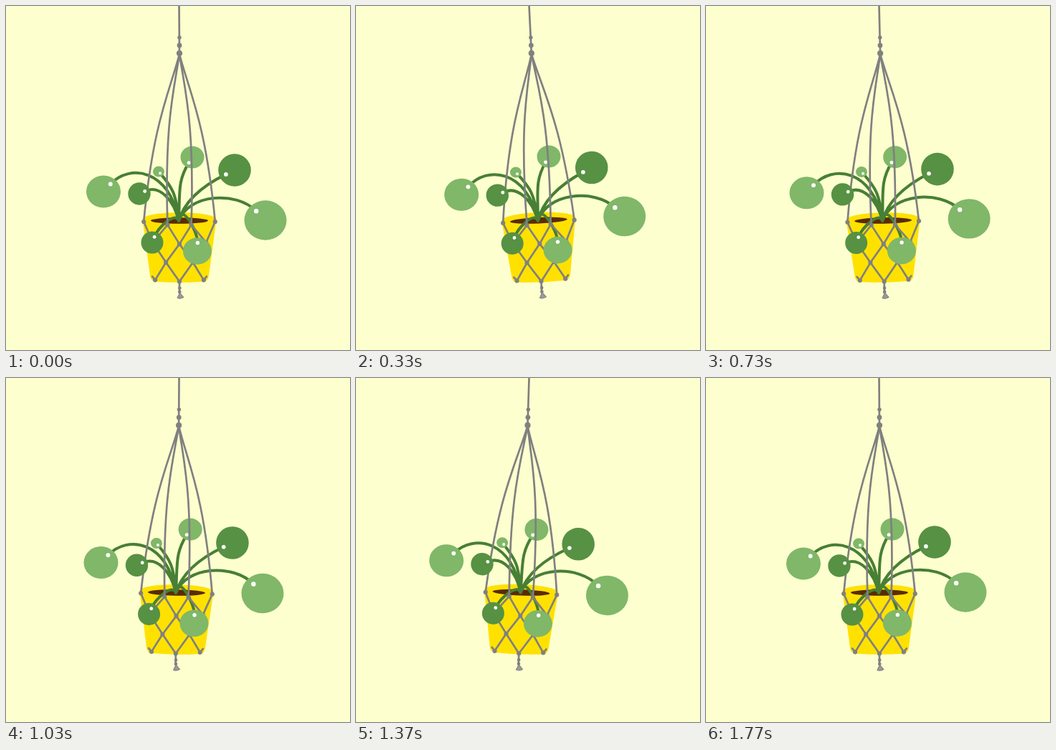
Recreate the animation shown at these times as an HTML page. Size 480 by 480 pixels, loop 1.81 s.

```html
<!DOCTYPE html>
<html lang="en">
<head>
<meta charset="utf-8">
<title>Hanging plant</title>
<style>
html, body { margin: 0; height: 100%; overflow: hidden; background: #feffcf; }
svg { display: block; width: 100vw; height: 100vh; }
#stems, #ropes { fill: none; stroke-linecap: round; stroke-linejoin: round; }
#stems { stroke: #477f35; stroke-width: 4; }
#ropes { stroke: #808080; stroke-width: 2.7; }
#knots { fill: #808080; }
</style>
</head>
<body>
<svg viewBox="0 0 480 480">
  <g id="plant">
    <path fill="#ffe100" d="M190.500 298C191 285 293 285 293.500 298L283 376Q282 384 276 384.500Q242 387 208 384.500Q202 384 201 376Z"/>
    <ellipse cx="242" cy="299.500" rx="40" ry="4.300" fill="#5a2b08"/>
    <path id="stems"/>
    <g id="back"></g>
    <path id="ropes"/>
    <g id="knots"></g>
    <path fill="#999" stroke="#808080" d="M242.500 400L248 406.500Q243 409.500 239 407.500Z"/>
    <g id="front"></g>
  </g>
</svg>
<script>
const $ = id => document.getElementById(id);
const light = '#80b769', dark = '#579143';
const midX = 242, base = [241, 300];

function oval(layer, x, y, rx, ry = rx, fill) {
  const e = document.createElementNS('http://www.w3.org/2000/svg', 'ellipse');
  Object.entries({ cx: x, cy: y, rx, ry }).forEach(([k, v]) => e.setAttribute(k, v));
  if (fill) e.setAttribute('fill', fill);
  $(layer).append(e);
}

function addPath(id, d) {
  $(id).setAttribute('d', ($(id).getAttribute('d') || '') + d);
}

// angle (degrees) points from the leaf centre along its stem; lift bends the stem up from its base
function leaf(layer, x, y, r, fill, angle, lift) {
  const a = angle * Math.PI / 180;
  const along = d => [x + d * Math.cos(a), y + d * Math.sin(a)];
  const offset = 0.7 * r - 2.5;
  const [sx, sy] = along(offset);
  const reach = 0.37 * Math.hypot(base[0] - sx, base[1] - sy);
  const bend = [base[0] + 0.13 * (sx - base[0]), base[1] - lift];
  addPath('stems', `M${sx} ${sy}C${along(offset + reach)} ${bend} ${base}`);
  oval(layer, x, y, r, fill === light ? 0.94 * r : r, fill);
  oval(layer, sx, sy, 1.6 + 0.055 * r, undefined, '#fff');
}

leaf('back', 136, 259, 24, light, -47, 72);
leaf('back', 213, 231, 8, light, 49, 38);
leaf('back', 260, 211, 16.5, light, 122, 40);
leaf('back', 319, 229, 22.8, dark, 154, 30);
leaf('back', 362, 299, 29.5, light, -135, 38);
leaf('front', 186, 262, 15.7, dark, -25, 28);
leaf('front', 204, 330, 15.5, dark, -68, 14);
leaf('front', 267, 342, 20, light, -88, 28);

// net knot in a row, k half-columns from the middle, on a slightly round pot
function knot(k, row) {
  return [
    midX + k * (16.6 + 2.4 * Math.sin(row)),
    301 + 26.2 * row + 0.55 * (9 - k * k)
  ];
}

const rows = [[-3, -1, 1, 3], [-2, 0, 2], [-1, 1], [-2, 0, 2]];
rows.forEach((row, i) => row.forEach(k => {
  oval('knots', ...knot(k, i), 3.1);
  for (const next of [k - 1, k + 1])
    if (rows[i + 1]?.includes(next)) addPath('ropes', `M${knot(k, i)}L${knot(next, i + 1)}`);
}));

for (const k of rows[0]) {
  const spread = Math.sign(k) * Math.sqrt(Math.abs(k));
  addPath('ropes', `M${midX} 67C${midX + 7.5 * spread} 118 ${midX + 21 * spread} 160 ${knot(k, 0)}`);
}
for (const side of [-1, 1]) addPath('ropes', `M${knot(2 * side, 3)}l${4 * side} -5`);
addPath('ropes', `M241.5 -6L${midX} 67M${midX} 385V400`);

for (let i = 0; i < 3; i++) oval('knots', midX, 44 + 11 * i, 2.7 + 0.7 * i);
for (let i = 0; i < 2; i++) oval('knots', midX + 0.3, 393.5 + 5.5 * i, 2.3);

// swing turning points: time in ms, angle in degrees
const turns = [[0, 0], [400, 2.95], [1320, -2.45], [1767, 0]];

function swing(t) {
  const i = Math.max(1, turns.findIndex(turn => t <= turn[0]));
  const [t0, a0] = turns[i - 1], [t1, a1] = turns[i];
  return a0 + (a1 - a0) * (t - t0) / (t1 - t0);
}

const step = 100 / 3, loop = 1810;
const start = performance.now();

function draw() {
  const t = (performance.now() - start) % loop;
  const angle = swing(Math.min(1767, Math.floor((t + 4) / step) * step));
  $('plant').setAttribute('transform', `rotate(${-angle} 241.5 0)`);
  requestAnimationFrame(draw);
}
draw();
</script>
</body>
</html>
```
